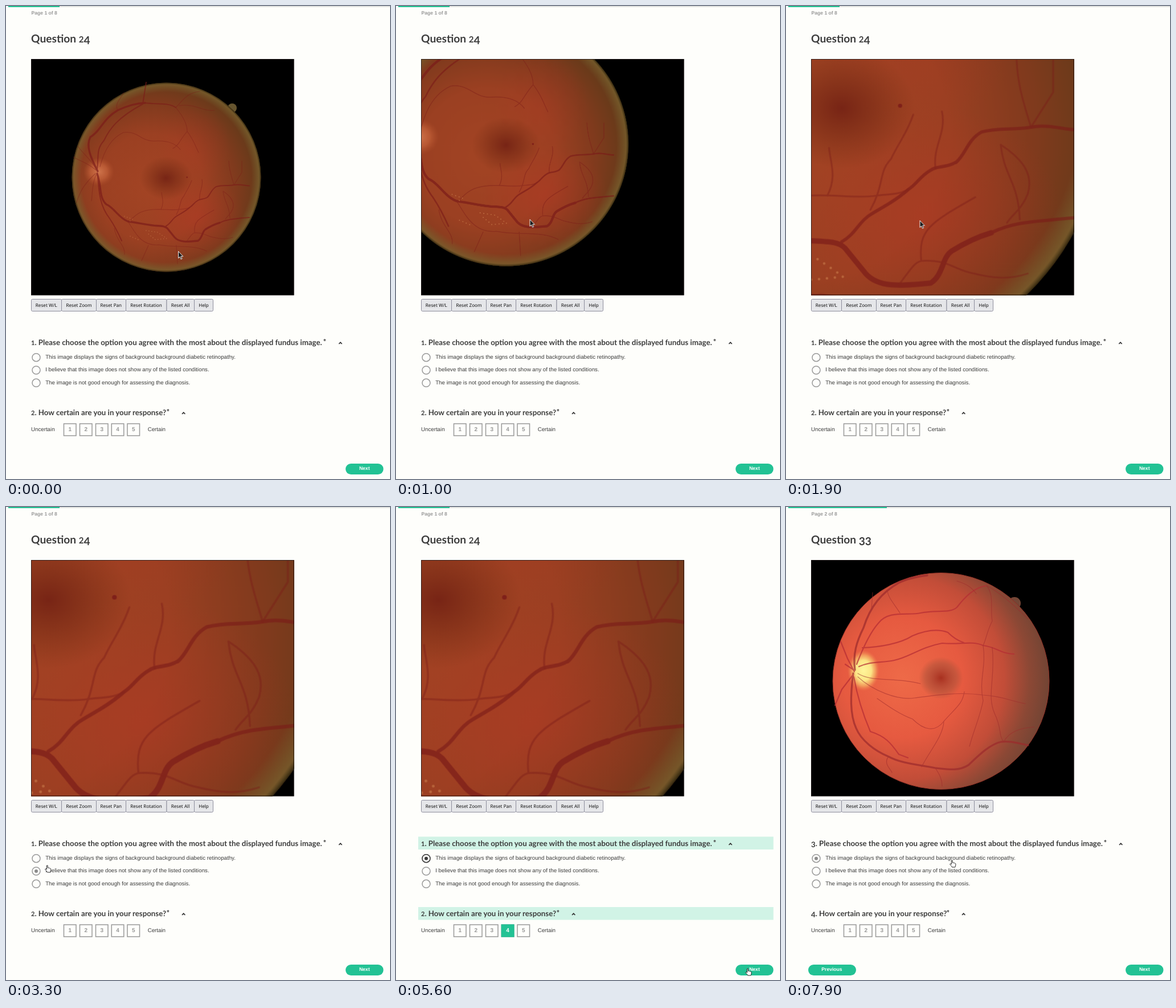
An HTML page for the animation above (8 s loop, 674 by 830 pixels).

```html
<!DOCTYPE html>
<html lang="en">
<head>
<meta charset="utf-8">
<title>Fundus survey</title>
<style>
html, body { margin: 0; width: 100%; height: 100%; overflow: hidden; background: #fefefb; }
svg { display: block; text-rendering: geometricPrecision; }
text { font: 9.73px "Liberation Sans", Arial, sans-serif; fill: #3c3c3c; white-space: pre; }
.title { font: 700 19.2px Lato, sans-serif; }
.head text { font: 700 13.28px Lato, sans-serif; }
.title .low { font-size: 15px; }
.head .low { font-size: 11px; }
.page { font-weight: 700; font-size: 8.6px; fill: #999; }
.nav { font-weight: 700; font-size: 8.6px; fill: #fff; text-anchor: middle; }
.tools rect { fill: #e5e6e9; stroke: #8d8d9c; }
.tools text { font: 500 8.15px "Noto Sans", "Open Sans", sans-serif; fill: #111; text-anchor: middle; }
.digits text { font-weight: 700; font-size: 10px; fill: #999; text-anchor: middle; }
.digits rect, .ring { fill: none; stroke: #999; stroke-width: 1.5; }
.dot { fill: #8c8c8c; }
.green { fill: #22c294; }
.bar { fill: #d1f3e6; }
.chev { fill: none; stroke: #333; stroke-width: 1.7; }
.veins { fill: none; stroke-linecap: round; stroke-linejoin: round; }

/* One shared 8 s clock; every change is a hard step. */
.view, .first, .second, .cursor, .arrow, .hand, .hover1, .hover2, .pick1, .pick4, .bar1, .bar2 {
  animation: 8s step-end infinite;
}
.view { animation-name: view; transform-origin: 275px 300px; }
.first { animation-name: first; }
.second { animation-name: second; }
.cursor { animation-name: cursor; }
.arrow { animation-name: arrow; }
.hand { animation-name: hand; }
.hover1 { animation-name: hover1; }
.hover2 { animation-name: hover2; }
.pick1 { animation-name: pick1; }
.pick4 { animation-name: pick4; }
.bar1 { animation-name: bar1; }
.bar2 { animation-name: bar2; }

@keyframes view {
  0% { transform: none; }
  5% { transform: translate(-23px, -15px); }
  6.25% { transform: translate(-48px, -32px); }
  7.5% { transform: translate(-69.5px, -45.3px); }
  11.25% { transform: scale(1.137) translate(-69.5px, -45.3px); }
  12.5% { transform: scale(1.293) translate(-69.5px, -45.3px); }
  13.75% { transform: scale(1.67) translate(-69.5px, -45.3px); }
  15% { transform: scale(2.16) translate(-69.5px, -45.3px); }
  20% { transform: scale(2.45) translate(-69.5px, -45.3px); }
  23.75% { transform: scale(2.79) translate(-69.5px, -45.3px); }
  25%, 100% { transform: scale(3.16) translate(-69.5px, -45.3px); }
}
@keyframes first { 0% { opacity: 1; } 73.75%, 100% { opacity: 0; } }
@keyframes second { 0% { opacity: 0; } 73.75%, 100% { opacity: 1; } }
@keyframes bar1 { 0% { opacity: 0; } 47.5% { opacity: .5; } 48.75%, 100% { opacity: 1; } }
@keyframes bar2 { 0% { opacity: 0; } 63.75% { opacity: .5; } 65%, 100% { opacity: 1; } }
@keyframes hover1 { 0% { opacity: 0; } 43.75% { opacity: 1; } 47.5% { opacity: 0; } 98.75%, 100% { opacity: 1; } }
@keyframes hover2 { 0% { opacity: 0; } 41.25% { opacity: 1; } 43.75%, 100% { opacity: 0; } }
@keyframes pick1 { 0% { opacity: 0; } 47.5%, 100% { opacity: 1; } }
@keyframes pick4 { 0% { opacity: 0; } 62.5%, 100% { opacity: 1; } }
@keyframes arrow {
  0% { opacity: 1; } 41.25% { opacity: 0; } 51.25% { opacity: 1; } 61.25% { opacity: 0; }
  68.75% { opacity: 1; } 70% { opacity: 0; } 93.75% { opacity: 1; } 98.75%, 100% { opacity: 0; }
}
@keyframes hand {
  0% { opacity: 0; } 41.25% { opacity: 1; } 51.25% { opacity: 0; } 61.25% { opacity: 1; }
  68.75% { opacity: 0; } 70% { opacity: 1; } 93.75% { opacity: 0; } 98.75%, 100% { opacity: 1; }
}
@keyframes cursor {
  0% { transform: translate(302px, 430px); }
  1.25% { transform: translate(325px, 440px); }
  2.5% { transform: translate(341px, 447px); }
  5% { transform: translate(306px, 423px); }
  6.25% { transform: translate(268px, 397px); }
  7.5% { transform: translate(234.5px, 374px); }
  23.75% { transform: translate(234.5px, 376px); }
  26.25% { transform: translate(232px, 385px); }
  27.5% { transform: translate(226px, 402px); }
  28.75% { transform: translate(218px, 422px); }
  30% { transform: translate(209px, 440px); }
  32.5% { transform: translate(200px, 452px); }
  33.75% { transform: translate(188px, 468px); }
  35% { transform: translate(174px, 484px); }
  36.25% { transform: translate(162px, 497px); }
  38.75% { transform: translate(138px, 528px); }
  40% { transform: translate(95px, 588px); }
  41.25% { transform: translate(68px, 628px); }
  42.5% { transform: translate(62px, 629px); }
  43.75% { transform: translate(56px, 624px); }
  45% { transform: translate(53px, 619px); }
  46.25% { transform: translate(51px, 616px); }
  50% { transform: translate(70px, 640px); }
  51.25% { transform: translate(105px, 690px); }
  52.5% { transform: translate(140px, 735px); }
  53.75% { transform: translate(170px, 772px); }
  55% { transform: translate(194px, 800px); }
  57.5% { transform: translate(196px, 811px); }
  58.75% { transform: translate(196px, 790px); }
  60% { transform: translate(194px, 762px); }
  61.25% { transform: translate(190px, 742px); }
  68.75% { transform: translate(430px, 785px); }
  70% { transform: translate(613px, 809px); }
  92.5% { transform: translate(607px, 804px); }
  93.75% { transform: translate(595px, 788px); }
  95% { transform: translate(585px, 775px); }
  97.5% { transform: translate(430px, 690px); }
  98.75%, 100% { transform: translate(287px, 619px); }
}
</style>
</head>
<body>
<svg width="674" height="830" viewBox="0 0 674 830">
  <defs>
    <clipPath id="frame"><rect x="44" y="93" width="461.5" height="414.5"/></clipPath>
    <radialGradient id="dim" gradientUnits="userSpaceOnUse" cx="255" cy="318" r="208">
      <stop offset="0" stop-color="#a34424"/><stop offset=".45" stop-color="#9b4022"/>
      <stop offset=".72" stop-color="#7f3a1d"/><stop offset="1" stop-color="#593a18"/>
    </radialGradient>
    <radialGradient id="glow">
      <stop offset="0" stop-color="#b83826" stop-opacity=".6"/><stop offset="1" stop-color="#b83826" stop-opacity="0"/>
    </radialGradient>
    <radialGradient id="spot">
      <stop offset="0" stop-color="#6e1d12" stop-opacity=".8"/><stop offset=".4" stop-color="#6f2412" stop-opacity=".5"/>
      <stop offset="1" stop-color="#6f2c12" stop-opacity="0"/>
    </radialGradient>
    <radialGradient id="nerve">
      <stop offset="0" stop-color="#d0754c"/><stop offset=".55" stop-color="#c05f38" stop-opacity=".8"/>
      <stop offset="1" stop-color="#b0502c" stop-opacity="0"/>
    </radialGradient>
    <radialGradient id="rim" gradientUnits="userSpaceOnUse" cx="281.5" cy="300.5" r="166">
      <stop offset=".9" stop-color="#79602e" stop-opacity="0"/><stop offset=".98" stop-color="#79602e" stop-opacity=".75"/>
      <stop offset="1" stop-color="#33280f"/>
    </radialGradient>
    <radialGradient id="bright" gradientUnits="userSpaceOnUse" cx="205" cy="300" r="262">
      <stop offset="0" stop-color="#ee6a48"/><stop offset=".4" stop-color="#e65a40"/>
      <stop offset=".68" stop-color="#c24d38"/><stop offset=".85" stop-color="#8c4835"/>
      <stop offset="1" stop-color="#6e4434"/>
    </radialGradient>
    <radialGradient id="halo">
      <stop offset="0" stop-color="#a9301f"/><stop offset=".35" stop-color="#b04430" stop-opacity=".85"/>
      <stop offset=".7" stop-color="#a85038" stop-opacity=".5"/><stop offset="1" stop-color="#a85038" stop-opacity="0"/>
    </radialGradient>
    <radialGradient id="lamp">
      <stop offset="0" stop-color="#fff59a"/><stop offset=".5" stop-color="#fbe585"/>
      <stop offset=".75" stop-color="#f5ac62" stop-opacity=".8"/><stop offset="1" stop-color="#ef7e50" stop-opacity="0"/>
    </radialGradient>
  </defs>

  <rect width="674" height="830" fill="#fefefb"/>
  <rect x="4" width="670" height="2" fill="#e3e4e1"/>
  <rect class="green" x="4" width="90" height="2"/>
  <rect x="44" y="93" width="461.5" height="414.5"/>

  <g class="first">
    <text class="page" x="44.500" y="15">Page 1 of 8</text>
    <text class="title" x="44" y="63.500">Question <tspan class="low">2</tspan><tspan dy="3">4</tspan></text>
    <g clip-path="url(#frame)">
      <g class="view">
        <circle cx="397" cy="179" r="8" fill="#66552f"/>
        <circle cx="281.500" cy="300.500" r="166" fill="url(#dim)"/>
        <ellipse cx="335" cy="370" rx="85" ry="70" fill="url(#glow)" opacity=".75"/>
        <ellipse cx="330" cy="245" rx="65" ry="70" fill="url(#glow)" opacity=".4"/>
        <ellipse cx="281" cy="302" rx="46" ry="38" fill="url(#spot)"/>
        <ellipse cx="163" cy="291" rx="27" ry="25" fill="url(#nerve)"/>
        <circle cx="281.500" cy="300.500" r="166" fill="url(#rim)"/>
        <g class="veins" stroke="#7b1b19" opacity=".68">
          <g stroke-width="3.300">
            <path d="M161 290C148 265 140 245 148 230C166 220 170 198 196 183C216 174 228 171 244 170"/>
            <path d="M160 294C168 318 163 336 176 348C190 354 198 372 214 378C235 381 245 384 261 385.400C274 386 279 386 283 390L296 406C304 415 318 414 337 412C345 407 344 396 350 392C358 387 366 383 375 380.400"/>
          </g>
          <g stroke-width="2" opacity=".9">
            <path d="M244 170C266 173 284 169 298 178M375 380.400C388 374 398 373.500 427 371"/>
            <path d="M160 286C163 262 158 252 172 236C182 215 196 196 240 172L246 134"/>
            <path d="M427 315.500C418 315 410 312 400 314C388 316 380 314 369 317C360 322 359 331 353 336C346 340 341 338 337 341C330 345 328 350 323 353C314 361 307 364 299 369C292 373 289 382 281 386"/>
            <path d="M161 298C163 325 164 350 182 373C190 385 196 396 203 412"/>
          </g>
          <g stroke-width="1.100" opacity=".6">
            <path d="M165 282C173 250 186 231 206 222C230 218 238 238 260 237C288 235 300 244 306 252"/>
            <path d="M298 178C310 193 318 206 318 220C330 236 332 245 338 257M318 220C304 236 305 243 293 250"/>
            <path d="M323 353C316 357 309 356 303 357C290 359 276 356 261 357C242 358 230 362 218 377"/>
            <path d="M391 272C392 290 396 300 400 314M414 272L414 292L400 314M381 325C398 336 401 346 398 356C394 366 389 368 385 374M381 325C383 345 392 348 393 372"/>
            <path d="M340 340C338 326 347 318 344 304M299 366C308 350 304 342 312 334C316 325 322 318 326 306M272 357C278 345 274 337 273 327"/>
            <path d="M317 413C324 404 327 398 332 398C348 397 352 404 364 406C376 409 386 410 398 406M331 398C329 378 337 374 365 358"/>
            <path d="M214 378C225 394 236 422 268 419C302 425 328 418 352 430M299 420L301 452M250 420L238 447M190 390C194 414 210 420 208 436"/>
            <path d="M158 288C142 274 130 272 118 265M157 294C142 308 130 322 124 345M158 296C150 316 152 330 150 342M158 286C150 270 136 260 126 246"/>
            <path d="M298 178C312 164 318 152 340 150M304 175C330 170 346 186 366 183M196 183C190 172 200 164 207 152"/>
          </g>
        </g>
        <path d="M208 369L222 374L214 380M246 394L266 397L282 408L262 410L250 400M218 404L232 410" fill="none" stroke="#d38a55" stroke-width="1.600" stroke-linecap="round" stroke-dasharray="0 5" opacity=".5"/>
        <circle cx="317.700" cy="300.500" r="1.300" fill="#7b1b19" opacity=".85"/>
      </g>
    </g>
    <rect class="bar bar1" x="39" y="578.500" width="623.500" height="22.500"/>
    <rect class="bar bar2" x="39" y="702" width="623.500" height="22.500"/>
    <g class="head">
      <text x="44" y="595"><tspan class="low">1</tspan>. Please choose the option you agree with the most about the displayed fundus image.</text>
      <text x="556.500" y="594">*</text>
      <text x="44" y="718"><tspan class="low">2</tspan>. How certain are you in your response?</text>
      <path class="chev" d="M584.300 593l2.700-2.700 2.700 2.700"/>
    </g>
  </g>

  <g class="second">
    <rect class="green" x="4" width="173" height="2"/>
    <text class="page" x="44.500" y="15">Page 2 of 8</text>
    <text class="title" x="44" y="63.500">Question <tspan dy="3">33</tspan></text>
    <g clip-path="url(#frame)">
      <circle cx="401" cy="169" r="11" fill="#744636"/>
      <circle cx="272" cy="305.500" r="190" fill="url(#bright)" stroke="#8e3026"/>
      <ellipse cx="272" cy="300" rx="39" ry="37" fill="url(#halo)"/>
      <ellipse cx="136" cy="287" rx="28" ry="36" fill="url(#lamp)"/>
      <g class="veins" stroke="#9c2a2c" opacity=".7">
        <g stroke-width="3.300">
          <path d="M121 286C117 258 124 236 136 212C148 174 168 150 198 133C214 125 232 122 248 120"/>
          <path d="M118 292C113 330 112 364 123 388C132 410 156 428 180 438C202 450 232 452 262 458C288 461 304 463 320 453C338 436 358 416 378 412C394 410 408 415 425 418"/>
        </g>
        <g stroke-width="2.200" stroke="#b52c34">
          <path d="M124 276C134 250 146 222 162 204C180 180 214 191 236 186C264 180 288 187 300 176C314 158 330 141 352 138"/>
          <path d="M128 280C150 270 166 274 190 269C216 264 236 246 274 239C306 242 326 234 346 243C370 246 376 257 400 258"/>
          <path d="M119 298C126 338 136 366 148 394C174 402 184 414 198 434L214 440"/>
          <path d="M134 247C164 246 200 240 222 226C246 216 268 214 284 220C292 228 300 234 312 238"/>
          <path d="M120 289L108 266L96 236M119 286L104 276M118 294L98 320L86 348"/>
        </g>
        <g stroke-width="1.200" opacity=".75">
          <path d="M126 292C150 308 194 298 236 310M126 298C152 322 196 340 226 335C262 330 304 324 346 330C380 332 392 340 420 345"/>
          <path d="M238 456C252 428 276 402 277 376C298 352 310 346 313 324M277 376C262 396 242 392 222 372C200 364 180 350 160 336"/>
          <path d="M346 243C352 280 338 304 346 340C340 370 330 390 322 420M362 246C368 300 352 330 366 362C380 392 372 398 382 412"/>
          <path d="M352 138C366 154 358 180 362 200C352 220 352 230 346 243M352 138C376 150 400 172 424 196M334 152C326 142 320 136 300 130"/>
          <path d="M382 412C392 394 410 388 436 386M262 458C270 470 274 478 274 490M180 438C170 450 184 460 186 466M150 180L152 150M200 186C190 170 180 160 178 148"/>
        </g>
      </g>
    </g>
    <g class="head">
      <text x="44" y="595"><tspan dy="2">3</tspan><tspan dy="-2">. Please choose the option you agree with the most about the displayed fundus image.</tspan></text>
      <text x="557.500" y="594">*</text>
      <text x="44" y="718"><tspan dy="2">4</tspan><tspan dy="-2">. How certain are you in your response?</tspan></text>
      <path class="chev" d="M585 593l2.700-2.700 2.700 2.700"/>
    </g>
    <rect class="green" x="39" y="803" width="84" height="19" rx="9.500"/>
    <text class="nav" x="80.500" y="814">Previous</text>
  </g>

  <rect x="44.500" y="93.500" width="460.500" height="413.500" fill="none" stroke="#1c1416" stroke-opacity=".8"/>

  <g class="head">
    <text x="281.500" y="717">*</text>
    <path class="chev" d="M309 716l2.700-2.700 2.700 2.700"/>
  </g>

  <g class="tools">
    <rect x="44.500" y="514.500" width="53" height="21" rx="2"/><text x="70.800" y="528">Reset W/L</text>
    <rect x="97.500" y="514.500" width="61" height="21" rx="2"/><text x="128" y="528">Reset Zoom</text>
    <rect x="158.500" y="514.500" width="52" height="21" rx="2"/><text x="184.300" y="528">Reset Pan</text>
    <rect x="210.500" y="514.500" width="71.500" height="21" rx="2"/><text x="246" y="528">Reset Rotation</text>
    <rect x="282" y="514.500" width="48.500" height="21" rx="2"/><text x="306" y="528">Reset All</text>
    <rect x="330.500" y="514.500" width="33" height="21" rx="2"/><text x="347" y="528">Help</text>
  </g>

  <circle class="ring" cx="53" cy="616.700" r="7"/>
  <circle class="ring" cx="53" cy="639" r="7"/>
  <circle class="ring" cx="53" cy="661.300" r="7"/>
  <circle class="dot hover1" cx="53" cy="616.700" r="3"/>
  <circle class="dot hover2" cx="53" cy="639" r="3"/>
  <text x="69.200" y="619">This image displays the signs of background background diabetic retinopathy.</text>
  <text x="69.200" y="641">I believe that this image does not show any of the listed conditions.</text>
  <text x="69.200" y="663.500">The image is not good enough for assessing the diagnosis.</text>

  <text x="44" y="745.500">Uncertain</text>
  <text x="248.700" y="745.500">Certain</text>
  <g class="digits">
    <rect x="101.500" y="733" width="21.500" height="21"/><text x="112.300" y="746">1</text>
    <rect x="129.500" y="733" width="21.500" height="21"/><text x="140.300" y="746">2</text>
    <rect x="157.500" y="733" width="21.500" height="21"/><text x="168.200" y="746">3</text>
    <rect x="185.300" y="733" width="21.500" height="21"/><text x="196" y="746">4</text>
    <rect x="213" y="733" width="21.500" height="21"/><text x="223.800" y="746">5</text>
  </g>

  <g class="first">
    <g class="pick1">
      <circle cx="53" cy="616.700" r="7" fill="#fefefb" stroke="#3a3a3a" stroke-width="1.500"/>
      <circle cx="53" cy="616.700" r="3" fill="#3a3a3a"/>
    </g>
    <g class="pick4 digits">
      <rect x="184.600" y="732.300" width="23" height="22.400" style="fill:#22c294;stroke:none"/>
      <text x="196" y="746" style="fill:#fff">4</text>
    </g>
  </g>

  <rect class="green" x="596" y="803" width="66.500" height="19" rx="9.500"/>
  <text class="nav" x="629.200" y="814">Next</text>

  <g class="cursor">
    <path class="arrow" d="M.500 .500V12.500L3.200 10L5 14.300L7 13.400L5.200 9.300H8.800Z" fill="#1c1c1c" stroke="#fff" stroke-width=".9"/>
    <path class="hand" d="M3.300 8V2C3.300 .300 5.300 .300 5.300 2V5.300C6 4.800 7 5 7.200 5.700C8 5.200 9 5.500 9.200 6.200C10 6 10.800 6.500 10.800 7.500V9.500C10.800 11 10 11.500 9.800 13H4.500C4 11.300 1.800 9.800 .900 8.200C.500 7.200 1.700 6.500 2.400 7.200Z" fill="#fff" stroke="#222" stroke-width="1"/>
  </g>
</svg>
</body>
</html>
```
